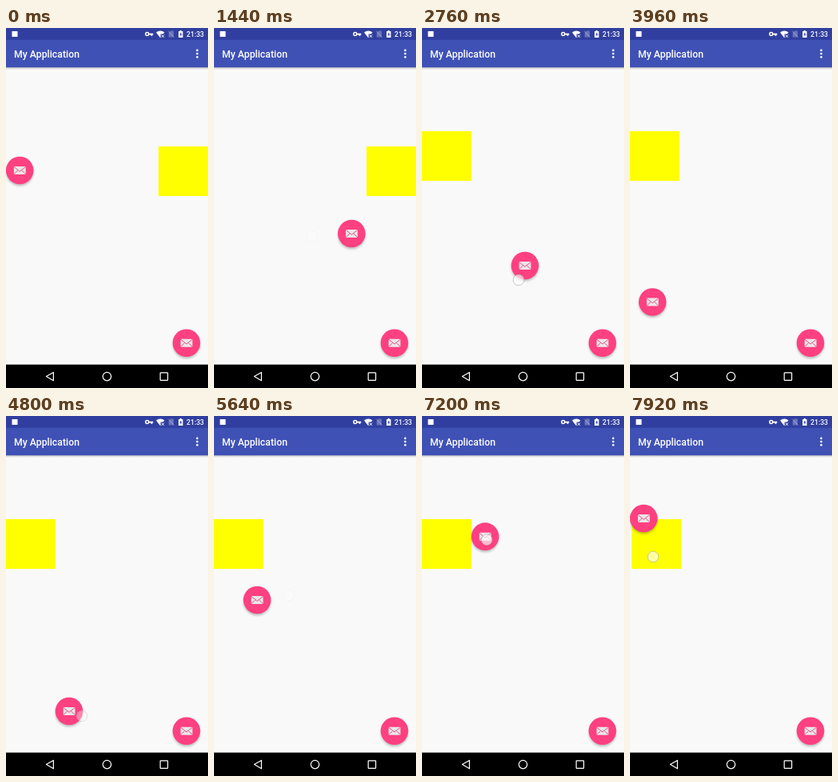
These frames come from a looping animation (253x450 px, 8 s). An HTML page:

```html
<!DOCTYPE html>
<html lang="en">
<head>
<meta charset="utf-8">
<title>Floating button</title>
<style>
  html, body { margin: 0; width: 100%; height: 100%; overflow: hidden; background: #f9f9f9; }
  svg { display: block; width: 100vw; height: 100vh; }
  text { font-family: Roboto, sans-serif; font-weight: 500; fill: #fff; }
</style>
</head>
<body>
<svg viewBox="0 0 253 450">
  <defs>
    <linearGradient id="barShade" x2="0" y2="1">
      <stop offset="0" stop-color="#000" stop-opacity=".24"/>
      <stop offset="1" stop-color="#000" stop-opacity="0"/>
    </linearGradient>
    <filter id="blur" x="-30%" y="-30%" width="160%" height="160%">
      <feGaussianBlur stdDeviation="1.5"/>
    </filter>
    <g id="button">
      <circle cy="2.3" r="17" opacity=".26" filter="url(#blur)"/>
      <circle r="17.3" fill="#ff4081"/>
      <rect x="-7.3" y="-4.9" width="14.8" height="10" rx="1" fill="#ebe6e8"/>
      <path d="M-7-4.3 0 1.3 7.2-4.3M-7 4.6-2.2-.3M7.2 4.6 2.3-.3" fill="none" stroke="#e0467c" stroke-width=".9"/>
    </g>
  </defs>

  <rect width="253" height="450" fill="#f9f9f9"/>
  <rect id="box" width="62" height="62" fill="#ff0"/>
  <use href="#button" x="226" y="393.7"/>
  <use id="fab" href="#button"/>

  <!-- app bar -->
  <rect y="49" width="253" height="3" fill="url(#barShade)"/>
  <rect width="253" height="49.2" fill="#3f51b5"/>
  <rect width="253" height="14.8" fill="#303f9f"/>
  <text x="10" y="36.9" font-size="12.3">My Application</text>
  <g fill="#fff">
    <circle cx="239.5" cy="27.9" r="1.35"/>
    <circle cx="239.5" cy="32.1" r="1.35"/>
    <circle cx="239.5" cy="36.3" r="1.35"/>
  </g>

  <!-- status icons -->
  <g fill="#fff">
    <rect x="7.5" y="4" width="7" height="7"/>
    <circle cx="176.8" cy="7.5" r="2" fill="none" stroke="#fff" stroke-width="1.5"/>
    <path d="M178.5 6.7h5.8v1.7h-1v1.6h-1.7V8.4h-3.1z"/>
    <path d="M188 5.4Q193.2 1.6 198.6 5.4L196.6 7.6H193.6V11.8L193.2 12.2z"/>
    <path d="M194.8 8.6 198 11.8M198 8.6 194.8 11.8" stroke="#fff"/>
    <path d="M206 3.6H210V11.6H203.7V6z" opacity=".28"/>
    <path d="M203 3.6 210.6 11.6" stroke="#fff" stroke-width=".8" opacity=".45"/>
    <path d="M217.8 3H219.8V4H221.5V12H216.1V4H217.8z"/>
    <path d="M219.3 5.3 217.4 8.4H218.6V10.7L220.4 7.5H219.3z" fill="#303f9f"/>
  </g>
  <text x="226" y="10.9" font-size="8.7">21:33</text>

  <!-- navigation bar -->
  <rect y="420.7" width="253" height="29.3"/>
  <g fill="none" stroke="#fff" stroke-width="1.2" stroke-linejoin="round">
    <path d="M50.4 435.6 59.4 430.4V440.8z"/>
    <circle cx="126.5" cy="435.6" r="5.2"/>
    <rect x="193.2" y="430.9" width="9.4" height="9.4" rx=".6"/>
  </g>

  <circle id="touch" r="6.8" fill="#fff" fill-opacity=".65" stroke="#aaa" stroke-opacity=".7" stroke-width=".9"/>
</svg>

<script>
const LOOP = 8000, STEP = 120;
const LEFT = 17.2, RIGHT = 235.8;

// start, release, settled, release x, release y, edge x, finger dx, finger dy
const fabDrags = [
  [960, 1320, 1800, 123, 257, RIGHT, 0, 4],
  [2520, 2880, 3240, 75.5, 317, LEFT, -8, 18],
  [3360, 3720, 4080, 116, 342.5, LEFT, -4, 5],
  [4320, 4800, 5040, 79, 369, RIGHT, 16, 6],
  [5160, 5520, 5880, 100, 230, LEFT, -6, -6],
  [6120, 6480, 6840, 117, 196, LEFT, -2, 2],
  [6960, 7320, 7800, 110, 128, LEFT, 2, 4]
];
const boxDrags = [
  [1800, 2040, 2280, 70, 129, 0, 27, 47],
  [7800, 8040, 8400, 4, 129, 0, 27, 47]
];

const el = id => document.getElementById(id);
const fab = el('fab'), box = el('box'), touch = el('touch');
const mix = (a, b, u) => a + (b - a) * u;
const clamp = u => Math.max(0, Math.min(1, u));
const easeOut = u => 1 - (1 - u) ** 2;

// Linear drag, then a decelerating slide to the edge.
function follow(drags, x, y, t) {
  let finger = null;
  for (const [start, release, end, rx, ry, edge, dx, dy] of drags) {
    if (t <= start) break;
    const pull = clamp((t - start) / (release - start));
    const hx = mix(x, rx, pull), hy = mix(y, ry, pull);
    const slide = easeOut(clamp((t - release) / (end - release)));
    finger = { x: hx + dx, y: hy + dy, alpha: clamp((release + 150 - t) / 270) };
    x = mix(hx, edge, slide);
    y = hy;
  }
  return { x, y, finger };
}

function place(node, { x, y }) {
  node.setAttribute('transform', `translate(${x.toFixed(2)} ${y.toFixed(2)})`);
}

function draw(time) {
  const t = Math.floor(time % LOOP / STEP) * STEP;
  const b = follow(boxDrags, 191, 148, t);
  const f = follow(fabDrags, LEFT, 178, t);
  place(box, b);
  place(fab, f);
  const finger = [b.finger, f.finger].find(p => p && p.alpha > 0);
  touch.setAttribute('opacity', finger ? finger.alpha : 0);
  if (finger) place(touch, finger);
}

const begin = performance.now();
function tick() {
  draw(performance.now() - begin);
  requestAnimationFrame(tick);
}
tick();
</script>
</body>
</html>
```
